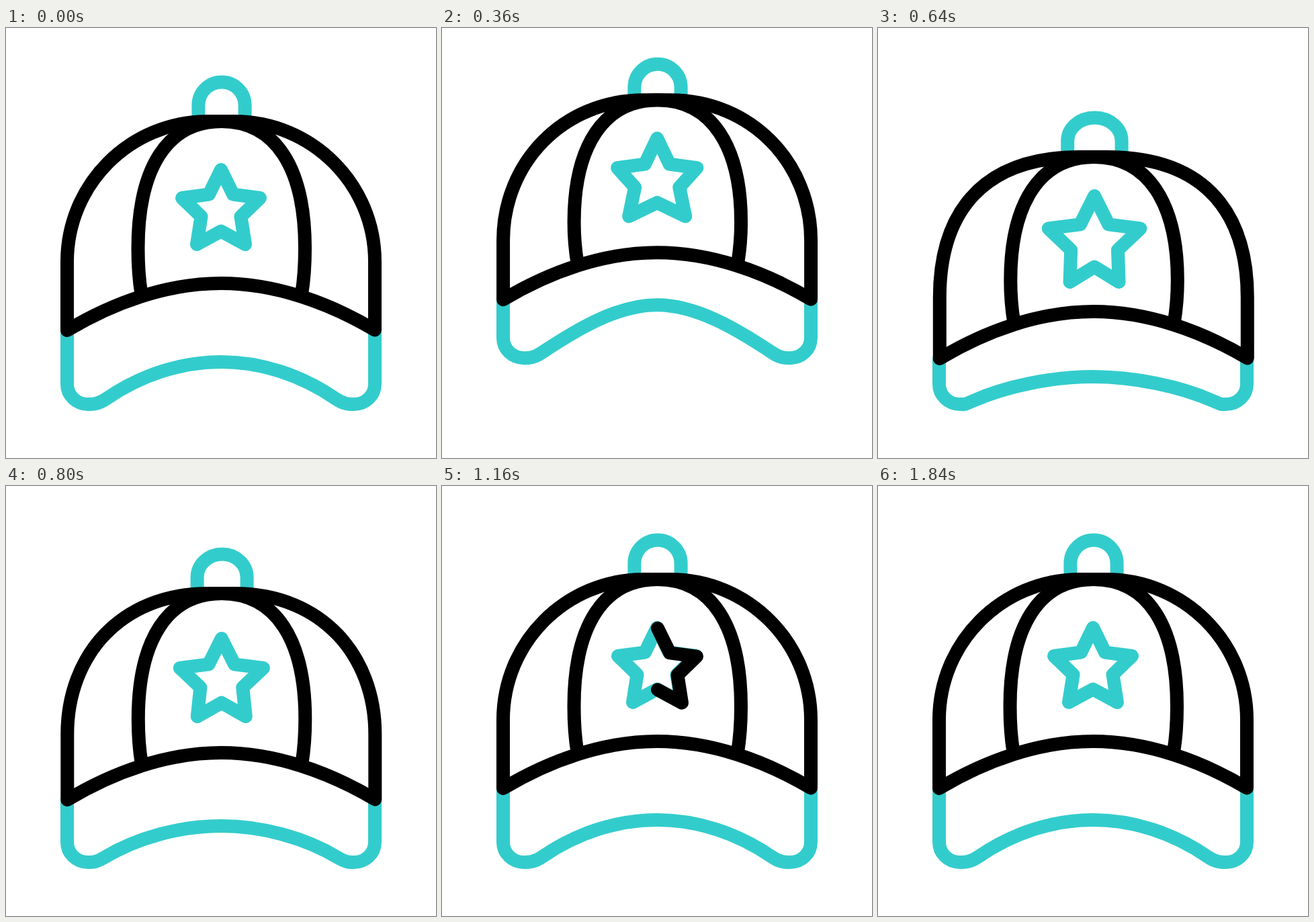
An HTML page that plays this animation: 640 by 640 pixels, repeating every 2000 ms.

```html
<!DOCTYPE html>
<html lang="en">
<head>
<meta charset="utf-8">
<title>Cap</title>
<style>
  html, body { margin: 0; width: 100%; height: 100%; overflow: hidden; background: #fff; }
  svg { display: block; width: 100vw; height: 100vh; }
  path { fill: none; stroke: #000; stroke-width: 20; stroke-linecap: round; stroke-linejoin: round; }
  .teal { stroke: #33cccc; }
</style>
</head>
<body>
<svg viewBox="0 0 640 640">
  <path id="loop" class="teal"/>
  <path id="brim" class="teal"/>
  <g id="dome">
    <path id="crown"/>
    <path id="panels"/>
  </g>
  <path id="star" class="teal"/>
  <path id="trace" pathLength="1" transform="translate(1 .7)"/>
</svg>
<script>
const LOOP = 2000, STEP = 40;
const parts = Object.fromEntries(
  ['loop', 'brim', 'dome', 'crown', 'panels', 'star', 'trace']
    .map(id => [id, document.getElementById(id)]));

// Offsets from the rest pose, in pixels
const NAMES = ['base', 'under', 'edge', 'top', 'ring', 'ringW', 'bulge', 'starTop', 'starEnd', 'arm', 'leg'];
const TIMES = [80, 240, 350, 480, 640, 800, 930];
const REST = NAMES.map(() => 0);
const POSES = [
  REST,
  [-52, -69, -36, -26, -16, 0, 0, -36, -34, 0, 5],
  [-69, -85, -46, -32, -27, 0, 4, -47, -42, 1, 6],
  [-52, -60, -19, -5, 5, 2.4, 15, -21, -13, 4, 5],
  [0, 22, 42, 53, 53, 5.6, 40, 39, 56, 10.3, .5],
  [0, 9, 17, 21, 21, 2.4, 15, 16, 21, 4, 0],
  REST
];

// Right half of the star, from the top point down to the lower notch
const STAR = [[0, 211], [18, 247.7], [58, 253], [29.5, 280.7], [36, 322], [0, 302.5]];

const clamp = x => Math.min(1, Math.max(0, x));
const progress = (t, from, to) => clamp((t - from) / (to - from));

// Smooth curve through the keys without overshoot
function sample(col, t) {
  const last = TIMES.length - 1;
  if (t <= TIMES[0] || t >= TIMES[last]) return 0;
  const val = i => POSES[i][col];
  const secant = i => (val(i + 1) - val(i)) / (TIMES[i + 1] - TIMES[i]);
  const slope = i => {
    if (i === 0 || i === last) return 0;
    const a = secant(i - 1), b = secant(i);
    return a * b <= 0 ? 0 : 2 * a * b / (a + b);
  };
  const i = TIMES.findIndex(k => k > t) - 1;
  const d = TIMES[i + 1] - TIMES[i], s = (t - TIMES[i]) / d, r = 1 - s;
  return r * r * (1 + 2 * s) * val(i) + s * s * (3 - 2 * s) * val(i + 1)
    + d * s * r * (r * slope(i) - s * slope(i + 1));
}

function loopPath(p) {
  const r = 34.6 + p.ringW, x = 321 + p.ringW * .25;
  const y = 115 + p.ring, foot = 139 + p.top;
  return `M${x - r} ${foot}V${y}A${r} 34.6 0 0 1 ${x + r} ${y}V${foot}`;
}

function brimPath(p) {
  const s = .69 - p.bulge * .006;
  const x = 149 - p.bulge * .25, y = 552 + p.base + p.bulge * .1;
  const low = 560 + p.base, side = 530 + p.base, mid = 497 + p.under, edge = 450 + p.edge;
  const m = v => 640 - v;
  return `M91 ${edge}V${side}C91 ${side + 17} 105 ${low} 122 ${low}`
    + `C128 ${low} ${x - 12} ${y + 12 * s} ${x} ${y}`
    + `C${x + 51} ${y - 51 * s} 260 ${mid} 320 ${mid}`
    + `C380 ${mid} ${m(x + 51)} ${y - 51 * s} ${m(x)} ${y}`
    + `C${m(x - 12)} ${y + 12 * s} 512 ${low} 518 ${low}`
    + `C535 ${low} 549 ${side + 17} 549 ${side}V${edge}`;
}

function crownPath(p) {
  const top = 139 + p.top, side = 348 + p.top, edge = 450 + p.edge;
  const mid = 380 + p.edge, low = 408.5 + p.edge, hand = 115.4 + p.bulge;
  return `M91 ${edge}V${side}C91 ${side - 115.4} ${300 - hand} ${top} 300 ${top}H340`
    + `C${340 + hand} ${top} 549 ${side - 115.4} 549 ${side}V${edge - .5}`
    + `C480 ${low} 400 ${mid} 320 ${mid}S160 ${low} 91 ${edge}Z`;
}

function panelsPath(p) {
  const mid = (p.top + p.edge) / 2, top = 139 + p.top;
  const half = (axis, k) => {
    const x = v => axis + k * v;
    return `M${axis} ${top}C${x(80)} ${top} ${x(124)} ${208 + p.top} ${x(124)} ${328 + mid}`
      + `C${x(124)} ${354 + mid} ${x(122)} ${378 + p.edge} ${x(119)} ${396 + p.edge}`;
  };
  return half(320.5, -1) + half(321, 1);
}

function starPath(p) {
  const cx = 320 + p.arm * .2;
  const widen = [0, p.arm * .3, p.arm, (p.arm + p.leg) / 2, p.leg, 0];
  const right = STAR.map(([x, y], i) =>
    [x + widen[i], y + p.starTop + (p.starEnd - p.starTop) * (y - 211) / 111]);
  const left = right.slice(1, -1).reverse().map(([x, y]) => [-x, y]);
  return 'M' + [...right, ...left].map(([x, y]) => `${cx + x} ${y}`).join('L') + 'Z';
}

function draw(t) {
  const p = Object.fromEntries(NAMES.map((name, i) => [name, sample(i, t)]));
  const star = starPath(p);
  parts.loop.setAttribute('d', loopPath(p));
  parts.brim.setAttribute('d', brimPath(p));
  parts.dome.setAttribute('transform', `translate(${p.bulge * .02} 0)`);
  parts.crown.setAttribute('d', crownPath(p));
  parts.panels.setAttribute('d', panelsPath(p));
  parts.star.setAttribute('d', star);

  // The black line runs round the star, then its tail follows
  const head = progress(t, 920, 1400), tail = progress(t, 1380, 1840);
  const { trace } = parts;
  trace.setAttribute('d', star);
  trace.style.visibility = head > tail ? 'visible' : 'hidden';
  trace.style.strokeDasharray = `${Math.max(0, head - tail)} 2`;
  trace.style.strokeDashoffset = -tail;
}

const start = performance.now();
function tick() {
  const t = (performance.now() - start) % LOOP;
  draw(Math.floor(t / STEP) * STEP);
  requestAnimationFrame(tick);
}
tick();
</script>
</body>
</html>
```
